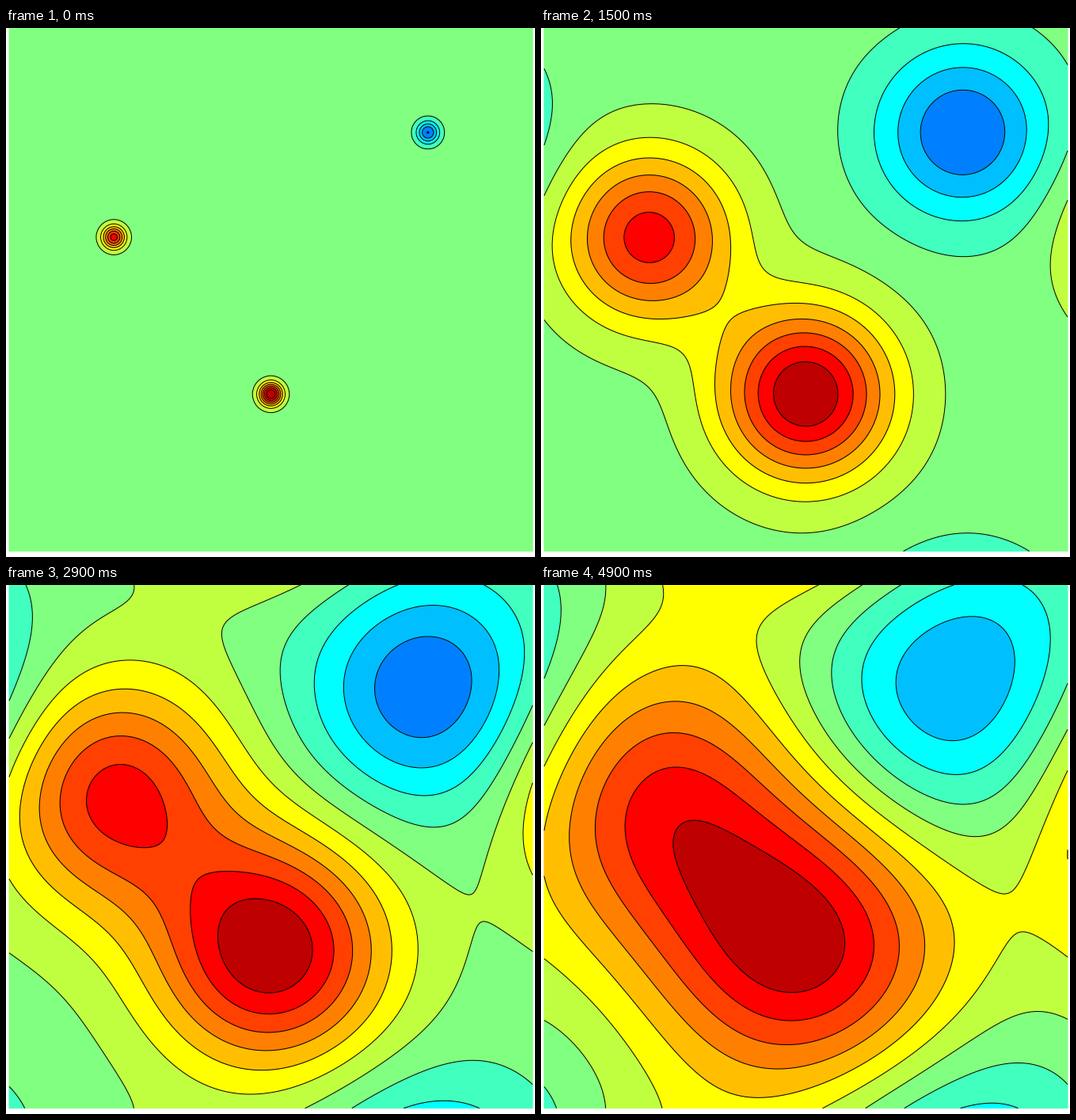
Animation of 668x668 px, one loop 5 s. Source, as a matplotlib script:

```python
import numpy as np
import matplotlib.pyplot as plt
from matplotlib.animation import FuncAnimation

SIZE, DPI = 668, 100
FRAMES, INTERVAL = 50, 100
N = 256
PERIOD = N / (N - 1)          # the sampled grid wraps one step past its last point
SPOTS = [(0.2, 0.6, 4), (0.5, 0.3, 5), (0.8, 0.8, -3)]   # x, y, strength
START_SPREAD, SPREAD_RATE = 0.00045, 0.001722
LEFT, RIGHT, TOP, BOTTOM = 4.0, 665.0, -0.3, 660.7       # plot area in pixels
LINE_WIDTH = 72 / DPI                                    # one pixel

grid = np.linspace(0, 1, N)
levels = np.linspace(-1, 1, 16)
fill_levels = np.append(levels[:-1], 1.1)


def band_color(k):
    x = 4 * (k + 1) / 16
    return tuple(np.clip([1.5 - abs(x - c) for c in (3, 2, 1)], 0, 1))


colors = [band_color(k) for k in range(15)]


def bell(center, spread):
    """Periodic Gaussian along one axis."""
    return sum(np.exp(-(grid - center + m * PERIOD) ** 2 / spread)
               for m in range(-2, 3))


def heat(frame):
    spread = START_SPREAD + SPREAD_RATE * frame
    u = sum(a * np.outer(bell(y, spread), bell(x, spread)) for x, y, a in SPOTS)
    return u / u.max()


fig = plt.figure(figsize=(SIZE / DPI, SIZE / DPI), dpi=DPI, facecolor="white")
ax = fig.add_axes([LEFT / SIZE, 1 - BOTTOM / SIZE,
                   (RIGHT - LEFT) / SIZE, (BOTTOM - TOP) / SIZE])
drawn = []


def draw(frame):
    while drawn:
        drawn.pop().remove()
    u = heat(frame)
    bands = ax.contourf(grid, grid, u, levels=fill_levels, colors=colors,
                        antialiased=True)
    bands.set(edgecolor="face", linewidth=LINE_WIDTH, clip_on=False)
    lines = ax.contour(grid, grid, u, levels=levels[:-1], colors="black",
                       linewidths=LINE_WIDTH, linestyles="solid")
    lines.set_clip_on(False)
    drawn.extend([bands, lines])
    ax.set(xlim=(0, 1), ylim=(0, 1))
    ax.set_axis_off()
    return drawn


anim = FuncAnimation(fig, draw, frames=FRAMES, init_func=lambda: draw(0),
                     interval=INTERVAL, repeat=True, repeat_delay=0, blit=False)
plt.show()
```
